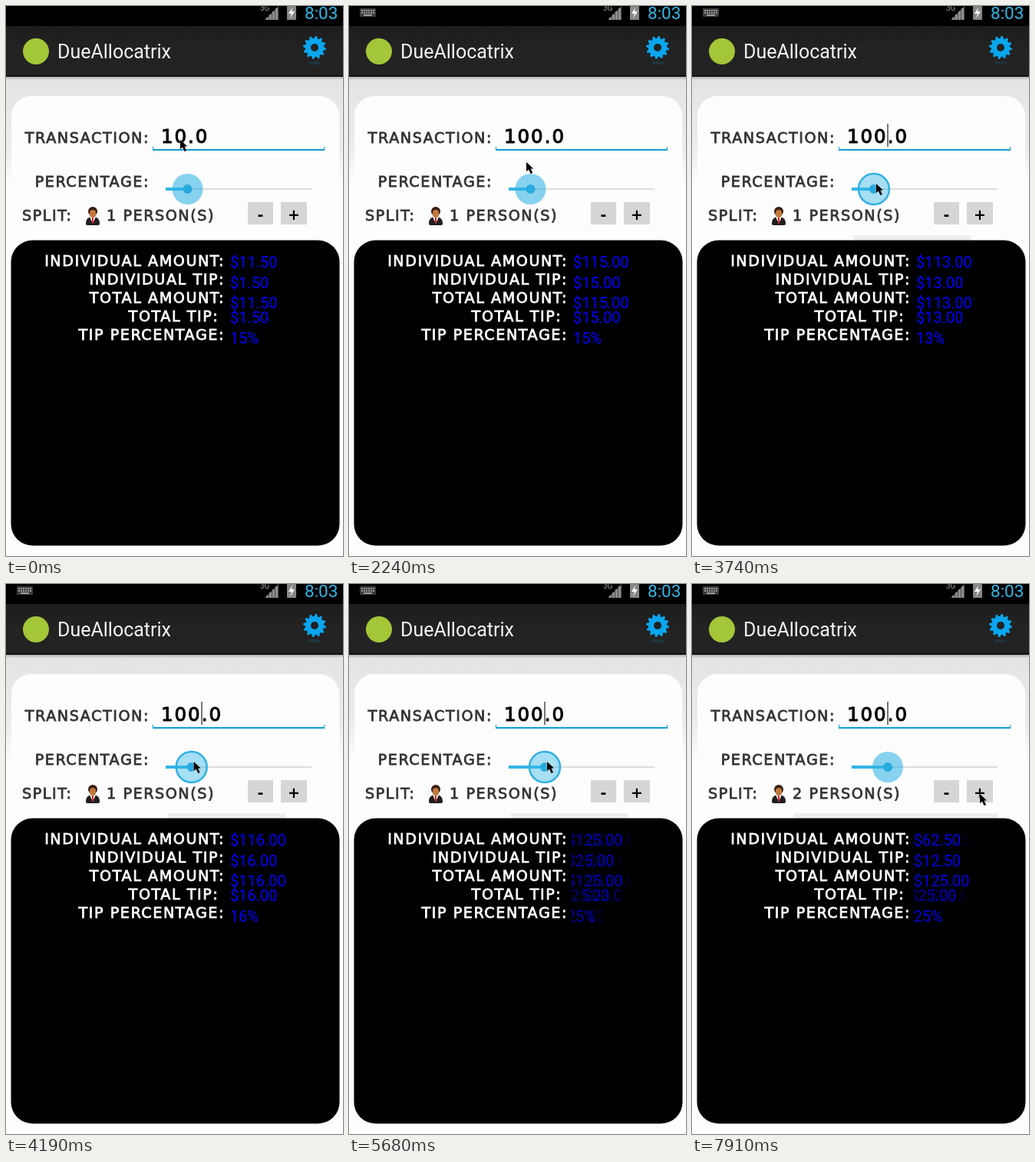
These frames come from a looping animation (439 by 715 pixels, 8000 ms). An HTML page with a canvas:

```html
<!DOCTYPE html>
<html lang="en">
<head>
<meta charset="utf-8">
<title>Tip screen</title>
<style>
  html, body { margin: 0; width: 439px; height: 715px; overflow: hidden; background: #fdfdfd; }
  canvas { display: block; }
</style>
</head>
<body>
<canvas id="stage" width="439" height="715"></canvas>
<script>
const ctx = document.getElementById('stage').getContext('2d');
const LOOP = 8000, STEP = 149.2;
const WIDE = '"DejaVu Sans", sans-serif', ROBOTO = 'Roboto, sans-serif';
const BLUE = '#33b5e5', LINE = '#0e9fd0';
const TAP = 1050, TYPE = 1650, GRAB = 3290, RELEASE = 6130, PRESS = 7320, LIFT = 7760;
const TRACK = 208, PIXELS_PER_PERCENT = 1.9;

const ramp = (t, from, to) => Math.max(0, Math.min(1, (t - from) / (to - from)));
const mix = (a, b, p) => a + (b - a) * p;
const isDragging = t => t >= GRAB && t < RELEASE;

const dragX = t => mix(232, 255, ramp(t, GRAB, 5440));
const thumbX = t => t < GRAB ? TRACK + 15 * PIXELS_PER_PERCENT : dragX(t);
const percentAt = t => Math.round((dragX(t) - TRACK) / PIXELS_PER_PERCENT);
const caretIsOn = t => isDragging(t) || Math.floor((t - 140) / 450) % 2 === 1;

// While the thumb is dragged the bill is refreshed at a steady beat.
const bill = (at, amount, percent, people = 1) => ({ at, amount, percent, people });
const bills = [bill(-LOOP, 10, 15), bill(1600, 100, 15)];
for (let at = 3240; at < 5500; at += 553) bills.push(bill(at, 100, percentAt(at + 150)));
bills.push(bill(7630, 100, 25, 2));

function rect(x, y, w, h, fill, radius = 0) {
  ctx.fillStyle = fill;
  ctx.beginPath();
  ctx.roundRect(x, y, w, h, radius);
  ctx.fill();
}

function disc(x, y, r, fill) {
  ctx.fillStyle = fill;
  ctx.beginPath();
  ctx.arc(x, y, r, 0, 7);
  ctx.fill();
}

function poly(points, fill) {
  ctx.fillStyle = fill;
  ctx.beginPath();
  points.forEach(p => ctx.lineTo(...p));
  ctx.closePath();
  ctx.fill();
}

function text(str, x, y, font, fill, align = 'left') {
  ctx.font = font;
  ctx.fillStyle = fill;
  ctx.textAlign = align;
  ctx.fillText(str, x, y);
}

// Widely set lettering, slightly thickened.
function lettering(str, x, y, fill, align = 'left', size = 19.2) {
  ctx.letterSpacing = size * .08 + 'px';
  text(str, x, y, `${size}px ${WIDE}`, fill, align);
  ctx.strokeStyle = fill;
  ctx.lineWidth = size * .04;
  ctx.strokeText(str, x, y);
  ctx.letterSpacing = '0px';
}

function shade(y0, y1, ...stops) {
  const g = ctx.createLinearGradient(0, y0, 0, y1);
  stops.forEach((c, i) => g.addColorStop(i / (stops.length - 1), c));
  return g;
}

function gear(x, y) {
  const teeth = 12, points = [];
  for (let i = 0; i < teeth * 4; i++) {
    const a = (i + .5) * Math.PI / teeth / 2, r = i % 4 < 2 ? 15 : 12;
    points.push([x + r * Math.cos(a), y + r * Math.sin(a)]);
  }
  poly(points, '#0aa6ee');
  disc(x, y, 5, '#222');
}

function statusBar(t) {
  rect(0, 0, 439, 26, '#000');
  if (t >= TAP) {
    rect(14, 3, 21, 11, '#3c3c3c', 1);
    for (let i = 0; i < 12; i++) rect(16 + i % 6 * 3, 5 + (i / 6 | 0) * 3, 2, 2, '#999');
    rect(19, 11, 11, 2, '#999');
  }
  text('3G', 331, 6, `10px ${ROBOTO}`, '#999');
  poly([[337, 18], [355, 18], [355, 0]], '#555');
  for (let i = 0; i < 4; i++) rect(339 + i * 4, 15 - i * 4, 3, 3 + i * 4, '#8c8c8c');
  rect(366, 0, 12, 18, '#888', 1);
  poly([[373, 2], [368, 10], [372, 10], [370, 16], [376, 7], [372, 7]], '#fff');
  text('8:03', 389, 17, `22.5px ${ROBOTO}`, BLUE);
}

function actionBar() {
  rect(0, 26, 439, 66, shade(26, 92, '#1d1d1d', '#232323', '#222'));
  rect(0, 90, 439, 2, '#111');
  disc(39, 59, 17, '#a4c639');
  text('DueAllocatrix', 67, 68, `25px ${ROBOTO}`, '#f3f3f3');
  gear(402, 54);
  rect(394, 72, 16, 4, '#0aa3ee22', 2);
}

function person(x, y) {
  rect(x - 9, y + 1, 18, 11, '#241d1d', [8, 8, 2, 2]);
  poly([[x - 4, y + 1], [x + 4, y + 1], [x, y + 10]], '#fff');
  rect(x - 1, y + 2, 2, 7, '#d22');
  disc(x, y - 6, 6, '#3a1d10');
  rect(x - 4, y - 8, 8, 10, '#c0783f', 4);
}

function button(sign, x, width) {
  rect(x, 255, width, 29, '#d6d6d6');
  text(sign, x + width / 2, 278, `bold 19px ${WIDE}`, '#000', 'center');
}

function form(t) {
  rect(0, 92, 439, 623, '#fdfdfd');
  rect(0, 92, 439, 138, shade(92, 230, '#e3e3e3', '#e8e8e8', '#ececec', '#fdfdfd'));
  rect(0, 92, 439, 4, shade(92, 96, '#aaa', '#e3e3e3'));
  rect(7, 117, 427, 215, '#fdfdfd', 26);
  if (t >= LIFT) rect(132, 298, 266, 8, '#efefef');
  else if (t >= GRAB) rect(211, 298, 153, 8, '#efefef');

  lettering('TRANSACTION:', 187, 178, '#333', 'right');
  lettering('PERCENTAGE:', 187, 235, '#333', 'right');
  lettering('SPLIT:', 21, 279, '#333');
  person(113, 273);
  lettering((t < LIFT ? 1 : 2) + ' PERSON(S)', 131, 279, '#333');
  lettering(t < TYPE ? '10.0' : '100.0', 202, 178, '#000', 'left', 24.5);

  rect(191, 186, 224, 2, LINE);
  for (const x of [191, 414]) rect(x, 183, 1, 5, LINE);
  if (caretIsOn(t)) rect(t < TYPE ? 235 : 254, 153, 2, 30, '#777');

  if (t >= PRESS && t < LIFT) rect(353, 250, 45, 34, '#33b5e588', 3);
  button('-', 315, 33);
  button('+', 358, 34);
}

function slider(t) {
  const x = thumbX(t);
  rect(TRACK, 237, 190, 2, '#dcdcdc');
  rect(TRACK, 236, x - TRACK, 4, BLUE);
  disc(x, 238, 20, isDragging(t) ? '#33b5e56e' : '#33b5e596');
  if (isDragging(t)) {
    ctx.strokeStyle = '#2fb0e2';
    ctx.lineWidth = 2.5;
    ctx.stroke();
  }
  disc(x, 238, 6, '#27aade');
  if (t >= TAP && t < TYPE) {
    poly([[236, 190], [254, 206], [254, 240], [218, 240], [218, 206]], '#5ec4ec');
    rect(218, 205, 35, 34, '#0a90d2', 3);
  }
}

// Old text leaves to the right while the new one enters from the left.
function slidingValue(format, y, t) {
  const i = bills.findLastIndex(b => b.at <= t);
  const p = ramp(t, bills[i].at, bills[i].at + 330), reach = 28;
  const draw = (entry, shift, alpha) => {
    const str = format(entry);
    ctx.save();
    ctx.font = `20px ${ROBOTO}`;
    ctx.beginPath();
    ctx.rect(290, y - 22, ctx.measureText(str).width + 2, 30);
    ctx.clip();
    ctx.globalAlpha = alpha;
    text(str, 292 + shift, y, ctx.font, '#00f');
    ctx.restore();
  };
  if (p < 1) draw(bills[i - 1], reach * p, 1 - p);
  draw(bills[i], reach * (p - 1), p);
}

const money = v => '$' + v.toFixed(2);
const tip = b => b.amount * b.percent / 100;
const total = b => b.amount + tip(b);
// label, baseline of the value, value, delay
const ROWS = [
  ['INDIVIDUAL AMOUNT:', 340, b => money(total(b) / b.people)],
  ['INDIVIDUAL TIP:', 367, b => money(tip(b) / b.people)],
  ['TOTAL AMOUNT:', 393, b => money(total(b))],
  ['TOTAL TIP: ', 412, b => money(tip(b)), 70],
  ['TIP PERCENTAGE:', 439, b => b.percent + '%']
];

function results(t) {
  rect(6.5, 304.5, 428, 397, '#000', 28);
  ROWS.forEach(([name, y, format, delay = 0], i) => {
    lettering(name, 285, 338 + 24 * i, '#fff', 'right');
    slidingValue(format, y, t - delay);
  });
}

// From the amount to the thumb, along with it, then over to the plus button.
function pointer(t) {
  const down = ramp(t, 1800, 2690), away = ramp(t, 6280, 7020);
  const x = mix(mix(227, dragX(t) + 3, down), 375, 1 - (1 - away) ** 3.5);
  const y = mix(mix(174, 231, down), 273, away);
  ctx.save();
  ctx.translate(x, y);
  ctx.lineWidth = 1;
  ctx.strokeStyle = '#ffffffb0';
  poly([[0, 0], [0, 12], [3, 9.5], [5.5, 15], [8, 14], [5.5, 8.5], [9, 8.5]], '#000');
  ctx.stroke();
  ctx.fill();
  ctx.restore();
}

function frame() {
  const now = performance.now() % LOOP;
  // The screen refreshes in coarse steps.
  const t = Math.floor(now / STEP) * STEP + 15;
  form(t);
  statusBar(t);
  actionBar();
  slider(t);
  results(t);
  pointer(t);
  requestAnimationFrame(frame);
}
frame();
</script>
</body>
</html>
```
